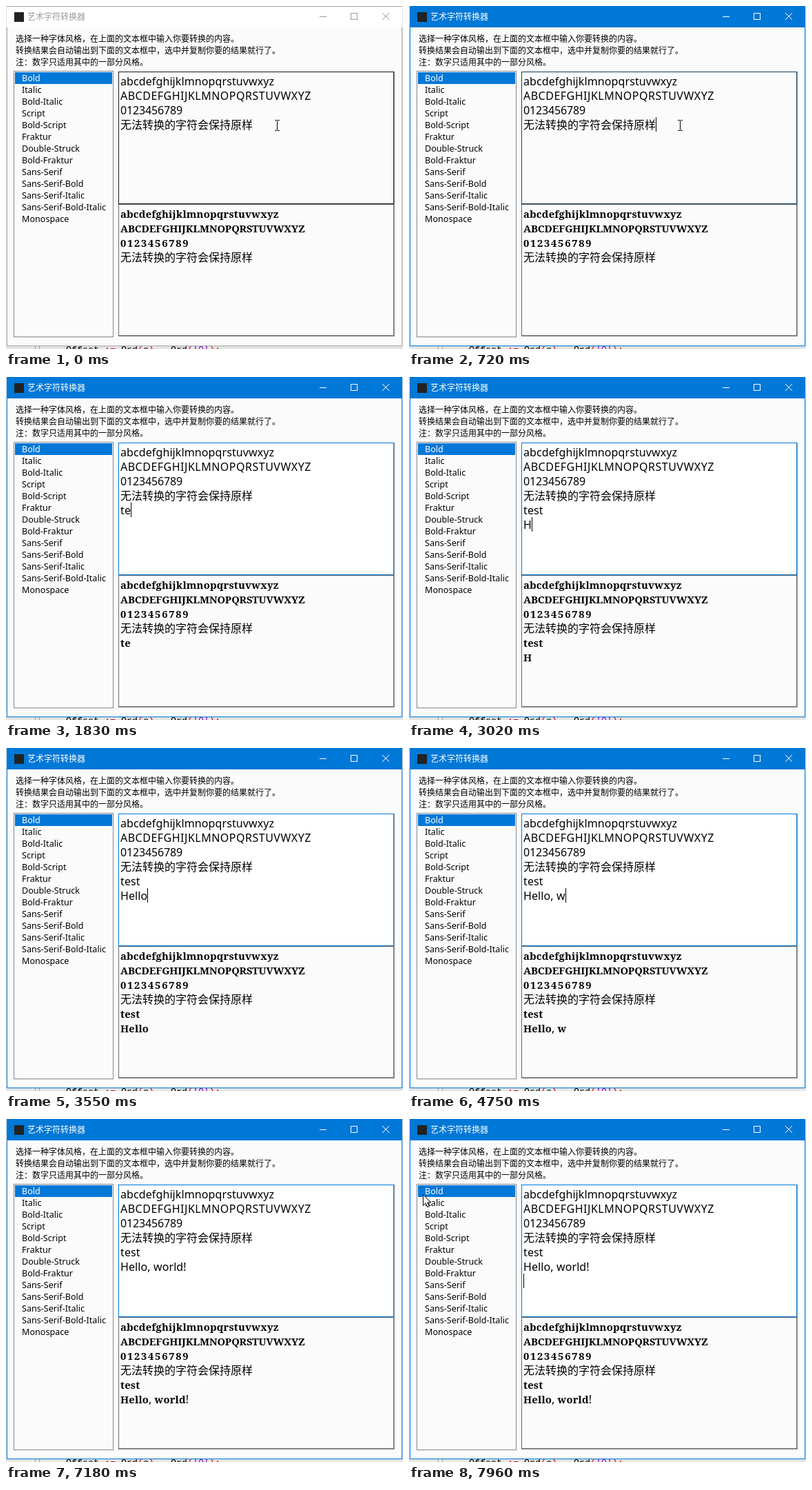
Recreate the animation shown at these times as an HTML page. Size 576 by 497 pixels, loop 8000 ms.

```html
<!DOCTYPE html>
<html lang="zh">
<head>
<meta charset="utf-8">
<style>
html, body { margin: 0; width: 100%; height: 100%; overflow: hidden; background: #fff; }
svg { display: block; width: 576px; height: 497px; shape-rendering: crispEdges; }
text { font: 16px "Noto Sans", "Noto Sans CJK SC", "Noto Sans CJK", sans-serif; white-space: pre; font-kerning: none; }
.ui { font-size: 12px; }
.item { font-size: 12.6px; }
.code { font: 13.33px "Liberation Mono", monospace; }
#input text { letter-spacing: .1px; }
#input .caps { letter-spacing: .5px; }
#input .digits { letter-spacing: -.15px; }
#input .cjk { letter-spacing: 0; }
.bold { font: bold 14.8px "Noto Serif", serif; letter-spacing: .2px; }
.caps .bold { letter-spacing: -.17px; }
.digits .bold { letter-spacing: 1.75px; }
.line { fill: none; stroke: #828790; }
.smooth { shape-rendering: geometricPrecision; }
</style>
</head>
<body>
<svg viewBox="0 0 576 497">
  <rect width="576" height="497" fill="#e4e4e4"/>
  <path d="M42.5 492v5M48.5 492v5" stroke="#a0a0a0"/>
  <text class="code" x="87" y="502">Offset <tspan fill="#d00000">:=</tspan> Ord<tspan fill="#d00000">(</tspan>c<tspan fill="#d00000">)</tspan> <tspan fill="#d00000">-</tspan> Ord<tspan fill="#d00000">(</tspan><tspan fill="#8000c0">'0'</tspan><tspan fill="#d00000">);</tspan></text>

  <rect id="frame" x="1.5" y=".5" width="573" height="492" fill="#fbfbfb"/>
  <rect id="bar" x="1" y="1" width="574" height="30"/>
  <rect x="12" y="9" width="14" height="14" fill="#222"/>
  <text id="title" class="ui" x="31" y="20">艺术字符转换器</text>
  <g id="buttons" fill="none">
    <path d="M455 15.5h10M500.5 10.5h9v9h-9z"/>
    <path class="smooth" d="M546 10l10 10M556 10l-10 10"/>
  </g>
  <text class="ui" x="14" y="52">选择一种字体风格，在上面的文本框中输入你要转换的内容。</text>
  <text class="ui" x="14" y="69">转换结果会自动输出到下面的文本框中，选中并复制你要的结果就行了。</text>
  <text class="ui" x="14" y="86">注：数字只适用其中的一部分风格。</text>

  <rect class="line" x="11.5" y="94.5" width="144" height="385"/>
  <rect x="13" y="96" width="141" height="17" fill="#0078d7"/>
  <g id="list"></g>

  <path d="M563.5 95v383.5H163" fill="none" stroke="#a0a0a0"/>
  <rect x="163.5" y="287.5" width="399" height="190" fill="none" stroke="#696969"/>
  <rect id="box" x="163.5" y="95.5" width="399" height="191"/>
  <g id="input"></g>
  <g id="output"></g>
  <rect id="caret" width="1" height="21"/>
  <path id="beam" fill="none" stroke="#000" d="M-3 -7.5h3M1 -7.5h3M.5 -7v14M-3 7.5h3M1 7.5h3"/>
  <path id="arrow" class="smooth" fill="#fff" stroke="#000" d="M.5 .5v16l3.7 -3.6l2.6 5.9l2.4 -1.1l-2.6 -5.7h5.1z"/>
</svg>
<script>
const LOOP = 8000, LEFT = 166, ROW = 21;
const $ = id => document.getElementById(id);
const styles = ["Bold", "Italic", "Bold-Italic", "Script", "Bold-Script", "Fraktur", "Double-Struck",
  "Bold-Fraktur", "Sans-Serif", "Sans-Serif-Bold", "Sans-Serif-Italic", "Sans-Serif-Bold-Italic", "Monospace"];
const initial = "abcdefghijklmnopqrstuvwxyz\nABCDEFGHIJKLMNOPQRSTUVWXYZ\n0123456789\n无法转换的字符会保持原样";
const typed = "\ntest\nHello, world!\n";

// [time, characters typed so far]
const keys = [[0, 0], [1430, 1], [1830, 3], [1950, 4], [2070, 5], [2190, 6], [3020, 7], [3140, 8],
  [3260, 9], [3410, 10], [3550, 11], [3960, 12], [4110, 13], [4750, 14], [5180, 15], [5330, 16],
  [5600, 17], [5720, 18], [6090, 19], [6650, 20]];
const caretStates = [[0, false], [720, true], [2750, false], [3020, true], [4630, false],
  [4750, true], [7180, false], [7710, true]];
// [time, pointer shape, x, y]
const pointer = [[0, "beam", 393, 173], [1430, ""], [7300, "beam", 350, 150], [7440, "beam", 236, 148],
  [7560, "arrow", 122, 131], [7710, ""], [7840, "arrow", 12, 113], [7960, "arrow", 20, 109]];

const at = (track, t) => track.findLast(step => step[0] <= t);
const paint = (id, attrs) => Object.entries(attrs).forEach(([k, v]) => $(id).setAttribute(k, v));
const kinds = { caps: /^[A-Z]{2}/, digits: /^\d/, cjk: /^[\u4e00-\u9fff]/ };
const kind = line => Object.keys(kinds).find(name => kinds[name].test(line)) ?? "";
const embolden = line => line.replace(/[A-Za-z0-9]+/g, run => `<tspan class="bold">${run}</tspan>`);
const rows = (lines, baseline, format) => lines.map((line, i) =>
  `<text class="${kind(line)}" x="${LEFT}" y="${baseline + i * ROW}">${format(line)}</text>`).join("");

$("list").innerHTML = styles.map((name, i) =>
  `<text class="item" x="23" y="${109 + i * 17}" fill="${i ? "#000" : "#fff"}">${name}</text>`).join("");

let shown = -1;
function setText(count) {
  if (count === shown) return;
  shown = count;
  const lines = (initial + typed.slice(0, count)).split("\n");
  $("input").innerHTML = rows(lines, 115, line => line);
  $("output").innerHTML = rows(lines, 307, embolden);
  const width = lines.at(-1) ? $("input").lastChild.getComputedTextLength() : 0;
  paint("caret", { x: LEFT + Math.round(width), y: 98 + (lines.length - 1) * ROW });
}

function draw(now) {
  const t = now % LOOP, active = t >= 720, focused = t >= 870;
  paint("frame", { stroke: active ? "#0078d7" : "#a8a8a8" });
  paint("bar", { fill: active ? "#0078d7" : "#fff" });
  paint("title", { fill: active ? "#fff" : "#999" });
  paint("buttons", { stroke: active ? "#fff" : "#999" });
  paint("box", {
    fill: focused ? "#fff" : "#fbfbfb",
    stroke: focused ? "#0078d7" : active ? "#14405f" : "#1a1a1a"
  });
  setText(at(keys, t)[1]);
  paint("caret", { visibility: at(caretStates, t)[1] ? "visible" : "hidden" });
  const [, shape, x, y] = at(pointer, t);
  for (const id of ["beam", "arrow"])
    paint(id, id === shape ? { visibility: "visible", transform: `translate(${x} ${y})` } : { visibility: "hidden" });
}

const start = performance.now();
function tick() {
  draw(performance.now() - start);
  requestAnimationFrame(tick);
}
tick();
</script>
</body>
</html>
```
